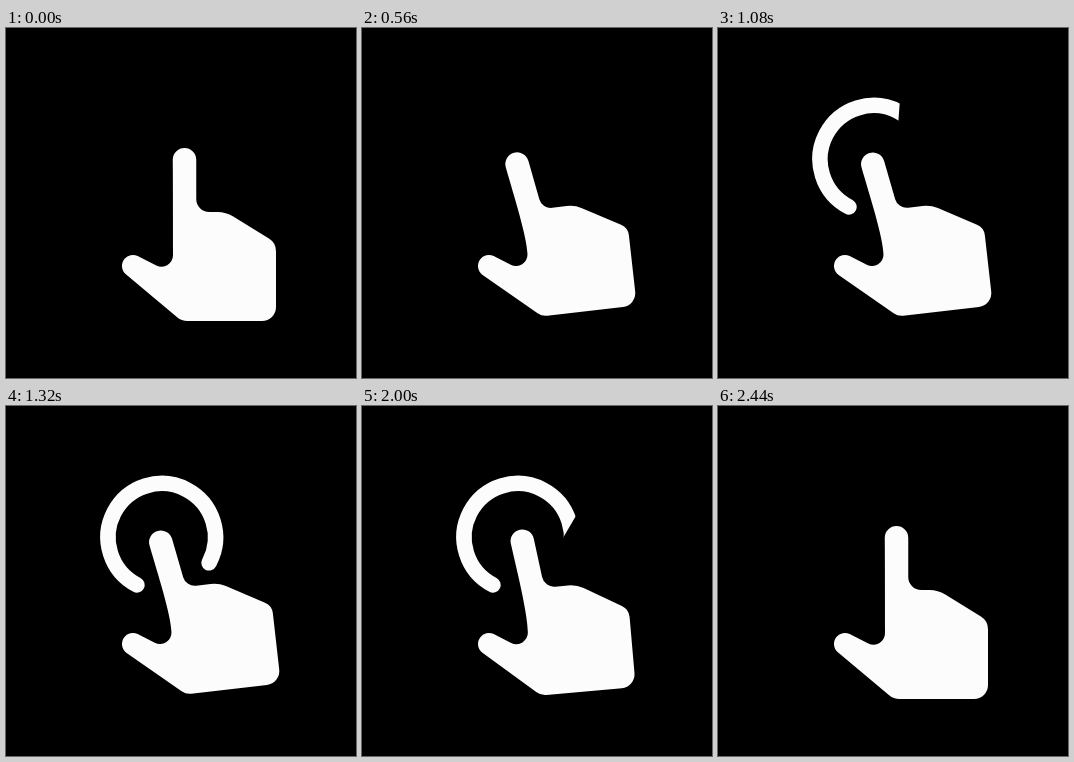
An HTML page with a canvas that plays this animation: 350 by 350 pixels, repeating every 3000 ms.

```html
<!DOCTYPE html>
<html lang="en">
<head>
<meta charset="utf-8">
<title>Tap gesture</title>
<style>
  html, body { margin: 0; width: 100%; height: 100%; overflow: hidden; background: #000; }
  canvas { display: block; width: 350px; height: 350px; }
</style>
</head>
<body>
<canvas id="stage" width="350" height="350"></canvas>
<script>
const ctx = document.getElementById('stage').getContext('2d');
const LOOP = 3000, STEP = 40;
const INK = '#fcfcfc';
const rad = deg => deg * Math.PI / 180;
const lerp = (a, b, k) => a + (b - a) * k;
const clamp = k => Math.min(1, Math.max(0, k));
const progress = (t, from, to) => clamp((t - from) / (to - from));
const smooth = k => k * k * (3 - 2 * k);

// Corners are x, y, radius, clockwise from the finger's base.
const RAISED = {
  tip: [178.5, 131.75], tilt: 0, thumbAngle: 130.5,
  corners: [[190.25, 184, 13], [220, 184, 30], [270, 215, 15], [270, 293, 14], [175.6, 293, 16]],
  crook: [167, 245.8], bend: [167, 200, 167, 160]
};
const PRESSED = {
  tip: [154.8, 136.2], tilt: -15.5, thumbAngle: 125.5,
  corners: [[180, 181, 12], [212.5, 177, 30], [266, 199.6, 13], [274.8, 277.3, 14], [180, 288.3, 14]],
  crook: [166, 245.5], bend: [165, 209, 152, 169]
};
const FINGER_R = 11.75;
const CROOK_R = 11.5;
const THUMB = { x: 127, y: 238, r: 11 };
const RING = { x: 155.75, y: 131.25, r: 53.75, width: 15.5, from: rad(117.5), to: rad(388.4) };
const WIPE = { x: 174, y: 178, hidden: -226, shown: 16 };

function mix(a, b, k) {
  if (typeof a === 'number') return lerp(a, b, k);
  if (Array.isArray(a)) return a.map((v, i) => mix(v, b[i], k));
  return Object.fromEntries(Object.keys(a).map(key => [key, mix(a[key], b[key], k)]));
}

function drawHand(press) {
  const { tip, tilt, thumbAngle, corners, crook, bend } = mix(RAISED, PRESSED, press);
  const lean = rad(tilt), under = rad(thumbAngle);
  const thumbStart = [THUMB.x + THUMB.r * Math.cos(under), THUMB.y + THUMB.r * Math.sin(under)];
  ctx.beginPath();
  ctx.arc(tip[0], tip[1], FINGER_R, Math.PI + lean, 2 * Math.PI + lean);
  corners.forEach(([x, y, r], i) => {
    const next = corners[i + 1] || thumbStart;
    ctx.arcTo(x, y, next[0], next[1], r);
  });
  ctx.arc(THUMB.x, THUMB.y, THUMB.r, under, rad(295));
  ctx.arcTo(crook[0], crook[1], bend[0], bend[1], CROOK_R);
  ctx.bezierCurveTo(...bend,
    tip[0] - FINGER_R * Math.cos(lean), tip[1] - FINGER_R * Math.sin(lean));
  ctx.closePath();
  ctx.fill();
}

function drawRing(reveal) {
  if (reveal <= 0) return;
  ctx.save();
  ctx.beginPath();
  ctx.moveTo(WIPE.x, WIPE.y);
  ctx.arc(WIPE.x, WIPE.y, 300, rad(WIPE.hidden), rad(lerp(WIPE.hidden, WIPE.shown, reveal)));
  ctx.closePath();
  ctx.clip();
  ctx.beginPath();
  ctx.arc(RING.x, RING.y, RING.r, RING.from, RING.to);
  ctx.lineWidth = RING.width;
  ctx.lineCap = 'round';
  ctx.stroke();
  ctx.restore();
}

function render() {
  const t = Math.floor(performance.now() % LOOP / STEP) * STEP;
  const press = smooth(progress(t, 0, 600)) - smooth(progress(t, 1800, 2440));
  const reveal = progress(t, 600, 1428) - progress(t, 1800, 2440);
  ctx.fillStyle = '#000';
  ctx.fillRect(0, 0, 350, 350);
  ctx.fillStyle = ctx.strokeStyle = INK;
  drawRing(reveal);
  drawHand(press);
  requestAnimationFrame(render);
}
render();
</script>
</body>
</html>
```
